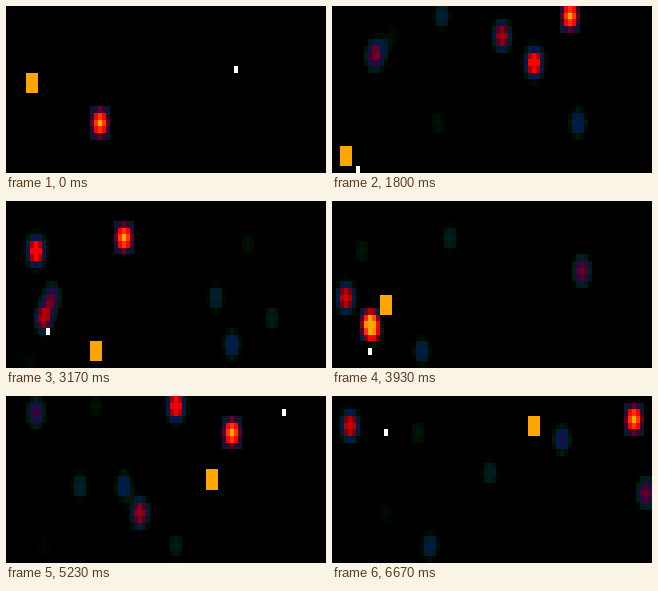
Write an HTML page with a canvas that moves like this. It is 320 px wide and 167 px high and loops after 6710 ms.

```html
<!DOCTYPE html>
<html lang="en">
<head>
<meta charset="utf-8">
<title>Heat spots</title>
<style>
  html, body { margin: 0; width: 100%; height: 100%; overflow: hidden; background: #000; }
  canvas { display: block; width: 100%; height: 100%; image-rendering: pixelated; }
</style>
</head>
<body>
<canvas id="stage" width="320" height="167"></canvas>
<script>
const COLS = 80, ROWS = 25, CELL = 4, H = 167;
const LOOP = 6710, LAST = 200, RATE = 3 / 100;
const BEAT = 4.1, LEAD = 0.1, COOLING = 13, COLD = 0.05;
const ctx = document.getElementById('stage').getContext('2d');

// The route: each spot is marked white, then orange, then glows and cools.
const spots = [
  [23, 17], [6, 11], [57, 9], [35, 11], [33, 22], [15, 4], [26, 17], [12, 6], [27, 1], [61, 17],
  [10, 7], [42, 4], [50, 8], [59, 1], [3, 22], [6, 24], [60, 6], [66, 17], [52, 14], [56, 21],
  [11, 14], [9, 17], [7, 7], [29, 5], [22, 22], [10, 19], [62, 10], [3, 14], [9, 18], [13, 15],
  [9, 22], [22, 1], [42, 22], [18, 13], [29, 13], [7, 2], [33, 17], [42, 1], [56, 5], [51, 12],
  [69, 2], [13, 17], [21, 5], [39, 11], [24, 22], [57, 6], [78, 14], [4, 4], [75, 3], [50, 4],
  [13, 5]
];

const ramp = (x, from, to) => Math.min(1, Math.max(0, (x - from) / (to - from)));
const rowY = r => Math.round(r * H / ROWS);

function cells(col, row, w, h, color) {
  ctx.fillStyle = color;
  ctx.fillRect(col * CELL, rowY(row), w * CELL, rowY(row + h) - rowY(row));
}

// Black, dark green, navy, dark red, red, orange.
function heatColor(h) {
  const r = 255 * ramp(h, 0.26, 0.62);
  const g = 28 * ramp(h, COLD, 0.13) * (1 - ramp(h, 0.25, 0.35)) + 170 * ramp(h, 0.7, 1);
  const b = 72 * ramp(h, 0.1, 0.22) * (1 - ramp(h, 0.28, 0.5));
  return `rgb(${[r, g, b].map(Math.round)})`;
}

// A fresh spot is pointed and compact; afterwards it is flat-topped and wider.
function addHeat(field, [cx, cy], age) {
  const fresh = age < BEAT;
  const reach = fresh ? 2 : 3;
  const left = Math.exp(-age / COOLING);
  for (let y = Math.max(0, cy - reach); y <= Math.min(ROWS - 1, cy + reach); y++) {
    for (let x = Math.max(0, cx - reach); x <= Math.min(COLS - 1, cx + reach); x++) {
      const d2 = (x - cx) ** 2 + (y - cy) ** 2;
      field[y * COLS + x] += fresh ? Math.exp(-d2 / 4.4) : left / (1 + (d2 / 3.5) ** 2);
    }
  }
}

function draw(n) {
  const field = new Float32Array(COLS * ROWS);
  const newest = Math.floor(n / BEAT + LEAD);
  for (let i = 0; i <= newest; i++) {
    const age = n - (i - LEAD) * BEAT;
    if (Math.exp(-age / COOLING) > COLD) addHeat(field, spots[i], age);
  }
  cells(0, 0, COLS, ROWS, '#000');
  field.forEach((heat, i) => {
    if (heat > COLD) cells(i % COLS, Math.floor(i / COLS), 1, 1, heatColor(heat));
  });
  const [ox, oy] = spots[newest + 1];
  cells(ox - 1, oy - 1, 3, 3, '#ffa500');
  const [wx, wy] = spots[newest + 2];
  cells(wx, wy, 1, 1, '#fff');
}

const start = performance.now();
let shown = -1;
function tick() {
  const t = (performance.now() - start) % LOOP;
  const n = Math.min(LAST, Math.floor((t + 5) * RATE));
  if (n !== shown) draw(shown = n);
  requestAnimationFrame(tick);
}
tick();
</script>
</body>
</html>
```
